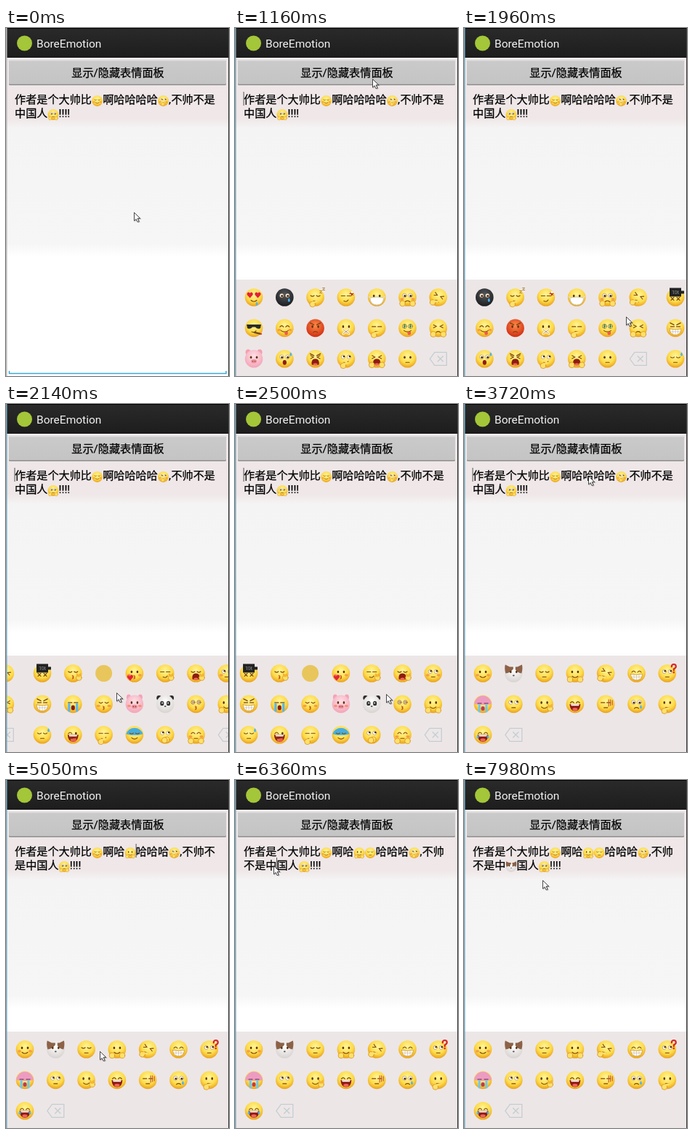
An HTML page for the animation above (8000 ms loop, 307 by 480 pixels).

```html
<!DOCTYPE html>
<html lang="zh">
<head>
<meta charset="utf-8">
<title>BoreEmotion</title>
<style>
html, body { margin: 0; width: 100%; height: 100%; overflow: hidden; background: #fff; }
svg { display: block; width: 100%; height: 100%; }
text { font: 15.15px Roboto, "Noto Sans CJK SC", "Noto Sans CJK", sans-serif; fill: #000; stroke: #000; stroke-width: .25px; }
#title { font-size: 15.5px; fill: #f2f2f2; stroke: none; }
</style>
</head>
<body>
<svg viewBox="0 0 307 480" preserveAspectRatio="none">
  <defs id="defs">
    <linearGradient id="bar" x2="0" y2="1"><stop stop-color="#2a2a2a"/><stop offset="1" stop-color="#1d1d1d"/></linearGradient>
    <linearGradient id="btn" x2="0" y2="1"><stop stop-color="#cacaca"/><stop offset="1" stop-color="#c4c4c4"/></linearGradient>
    <linearGradient id="bg" gradientUnits="userSpaceOnUse" x1="0" x2="0" y1="41" y2="480">
      <stop stop-color="#eee6e7"/><stop offset=".19" stop-color="#efe7e8"/><stop offset=".222" stop-color="#f5f4f4"/>
      <stop offset=".585" stop-color="#f6f6f6"/><stop offset=".625" stop-color="#fff"/>
    </linearGradient>
    <radialGradient id="yellow" cy=".35" r=".66"><stop stop-color="#fff59a"/><stop offset=".6" stop-color="#fddb4a"/><stop offset="1" stop-color="#e99e18"/></radialGradient>
    <radialGradient id="red" cy=".35" r=".66"><stop stop-color="#ff8a4a"/><stop offset="1" stop-color="#cf2c10"/></radialGradient>
    <radialGradient id="black" cy=".35" r=".66"><stop stop-color="#55585c"/><stop offset="1" stop-color="#1b1d20"/></radialGradient>
    <radialGradient id="pink" cy=".35" r=".66"><stop stop-color="#ffe0e6"/><stop offset="1" stop-color="#f2a3b6"/></radialGradient>
    <radialGradient id="white" cy=".35" r=".66"><stop stop-color="#fff"/><stop offset="1" stop-color="#d6d2cf"/></radialGradient>
    <clipPath id="view"><rect x="1" y="347" width="306" height="133"/></clipPath>
  </defs>
  <rect width="307" height="480" fill="url(#bg)"/>
  <path id="line" d="M4.5 473v3.5h298.5v-3.5" fill="none" stroke="#3fa9d0" stroke-width="1.5"/>
  <rect width="307" height="41" fill="url(#bar)"/>
  <rect width="307" height="1" fill="#000"/>
  <rect y="40" width="307" height="1" fill="#151515"/>
  <rect y="41" width="307" height="1" fill="#f6f2f2"/>
  <circle cx="25.5" cy="21" r="10.5" fill="#a4c639"/>
  <text id="title" x="42" y="26.5">BoreEmotion</text>
  <rect x="4" y="45" width="299" height="34" rx="1.5" fill="#8f8f8f"/>
  <rect x="4" y="44.5" width="299" height="33" rx="1.5" fill="url(#btn)"/>
  <path d="M5 45h297" stroke="#dcdcdc"/>
  <text x="154" y="67" text-anchor="middle">显示/隐藏表情面板</text>
  <g id="texts"></g>
  <rect id="caret" width="1" height="19" fill="#555"/>
  <g id="panel">
    <rect y="347" width="307" height="133" fill="#ede6e7"/>
    <g clip-path="url(#view)"><g id="strip"></g></g>
  </g>
  <rect id="edge" width="1.5" height="480"/>
  <rect x="306" width="1" height="480" fill="#3a3a3a"/>
  <path id="handle" d="M0 0l11.5 11v22a3 3 0 0 1-3 3h-17a3 3 0 0 1-3-3v-22z" fill="#33b5e5" opacity=".75"/>
  <g id="mouse">
    <path d="M1.5 1.5v12l3-2.7 2 4 2.2-1-1.9-4h4z" fill="#000" opacity=".25"/>
    <path d="M.5.5v11.5l2.7-2.5 1.9 4.2 2-.9-1.9-4.1h3.6z" fill="#fff" stroke="#333" stroke-width=".9"/>
  </g>
</svg>
<script>
const $ = id => document.getElementById(id);
const ink = '#7d460f';

// Emoji parts, drawn around 0,0 on a face of radius 12
const pair = f => f(-4) + f(4);
const path = (d, a = '') => `<path d="${d}" ${a}/>`;
const disc = (x, y, r, fill, a = '') => `<circle cx="${x}" cy="${y}" r="${r}" fill="${fill}" ${a}/>`;
const oval = (x, y, rx, ry, fill) => `<ellipse cx="${x}" cy="${y}" rx="${rx}" ry="${ry}" fill="${fill}" stroke="none"/>`;
const bare = 'stroke="none"';
const fill = c => `fill="${c}" ${bare}`;
const hand = (x, y) => disc(x, y, 3.8, '#fee06a', 'stroke="#d8921c" stroke-width=".8"');
const drop = (x, y) => path(`M${x} ${y}q-3 4 0 5.5q3-1.5 0-5.5`, fill('#4fb2ee'));
const heart = (x, y) => path(`M${x} ${y + 4}l-4-4.5q-.5-3.5 2.3-3.5q1.4 0 1.7 1.6q.3-1.6 1.7-1.6q2.8 0 2.3 3.5z`, fill('#e3203a'));
const ears = (rx, ry, x, y, c) => oval(-x, y, rx, ry, c) + oval(x, y, rx, ry, c);

const parts = {
  dot: pair(x => oval(x, -2, 1.3, 1.8, '#5a300a')),
  wide: pair(x => disc(x, -2.5, 2.8, '#fff', 'stroke-width=".4"') + disc(x + .4, -2, 1.5, '#4a2a0c', bare)),
  side: pair(x => disc(x, -2.5, 2.6, '#fff', 'stroke-width=".4"') + disc(x + 1, -3.3, 1.3, '#4a2a0c', bare)),
  shut: pair(x => path(`M${x - 2.5} -2.5q2.5 2.4 5 0`)),
  arc: pair(x => path(`M${x - 2.5} -1.5q2.5-3.6 5 0`)),
  flat: pair(x => path(`M${x - 2.6} -2h5.2`)),
  wink: path('M-6.500-1.500q2.500-3.600 5 0') + oval(4, -2, 1.3, 1.8, '#5a300a'),
  squint: path('M-6.5-4.5l4 2.2-4 2M6.5-4.5l-4 2.2 4 2'),
  cross: pair(x => path(`M${x - 2} 0l4 4m0-4l-4 4`)),
  love: pair(x => heart(x * 1.35, -3)),
  cash: pair(x => disc(x, -2.5, 3, '#f7f0b0', 'stroke-width=".6"') + path(`M${x + 1.3} -4q-3-1-2.6.7t2.4 1-2.8.9M${x} -5v5`, 'stroke="#2c7a2c" stroke-width=".8"')),
  swirl: pair(x => disc(x, -2.5, 2.6, '#fff6cc', 'stroke-width=".7"') + disc(x, -2.5, 1, 'none', 'stroke-width=".7"')),
  shades: path('M-10-5h20l-1 5q-4 2.500-7-1.500h-4q-3 4-7 1.500z', fill('#2b2b2b')),
  brow: path('M-7-7l5 2.500M7-7l-5 2.500', 'stroke-width="1.500"'),
  smile: path('M-4 4q4 3.600 8 0'),
  sad: path('M-3 6q3-2.600 6 0'),
  line: path('M-2.500 5h5'),
  smirk: path('M-3 5q4 2 6-1.500'),
  kiss: path('M-1 3q3 1 .500 2.200q2.500 1.200-.500 2.300', 'stroke="#b4401a"'),
  ohh: oval(0, 5, 2.6, 3.4, '#8c1d10'),
  open: path('M-7.500 0h15q-.500 9.500-7.500 9.500t-7.500-9.500', fill('#8e1a12')) + path('M-6 .300h12l-1 2h-10z', fill('#fff')) + oval(0, 7, 3.6, 2, '#f0655c'),
  roar: path('M-5 8q-1-8 5-8t5 8q-5 2-10 0', fill('#8c1d10')) + oval(0, 7.5, 3, 1.5, '#f0655c'),
  teeth: path('M-8 1q8 2 16 0q-.500 8.500-8 8.500t-8-8.500', 'fill="#fff" stroke="#c58a2a" stroke-width=".7"') + path('M-7 5h14M-3.500 2v6.500M0 2v7M3.500 2v6.500', 'stroke="#b9a58a" stroke-width=".5"'),
  tongue: path('M-5 3.500q5 3.500 10 0') + path('M0 5h4.500v3q-2.200 3-4.500 0z', fill('#ee5a50')),
  tape: path('M-4 2l8 6m0-6l-8 6', 'stroke="#fff6dc" stroke-width="3"') + path('M-4 2l8 6m0-6l-8 6', 'stroke-width=".5"'),
  mask: path('M-9.500 1q9.500-3 19 0q-1 9.500-9.500 9.500t-9.500-9.500', 'fill="#fff" stroke="#bcc5c9" stroke-width=".9"') + path('M-11-1l2 2M11-1l-2 2', 'stroke="#dde"'),
  blush: pair(x => `<g opacity=".65">${oval(x * 1.85, 2.5, 2.4, 1.7, '#f57a4a')}</g>`),
  hands: hand(-7, 8.5) + hand(7, 8.5),
  chin: hand(-4, 9.5) + path('M-3 7l5-1.500', 'stroke="#fee06a" stroke-width="2.600"'),
  palm: hand(8, 6) + path('M7 4l-1.500-3M9 4l1-3', 'stroke="#f2b32d" stroke-width="2"'),
  cover: hand(2, 6.5) + hand(-1, 7.5),
  sweat: drop(8.5, -9),
  tear: drop(6, 1),
  tears: drop(-7, 0) + drop(7, 0),
  drool: drop(4, 6),
  cry: pair(x => path(`M${x * 1.35} 0v9`, 'stroke="#58b7f0" stroke-width="3.200"')),
  wet: pair(x => path(`M${x * 1.2} 1v9`, 'stroke="#6cc9f2" stroke-width="3"')) + oval(0, 6, 2.6, 3, '#c23a4a'),
  band: path('M-11.500-3a12 12 0 0 1 23 0v3q-11 2-23 0z', fill('#ec9cc0')) + path('M-7-1h5M2-1h5', 'stroke="#8a3560"'),
  zzz: path('M6-9h3l-3 3h3M10-13h3l-3 3h3', 'stroke="#b58a3a" stroke-width="1"'),
  star: path('M5-5l5 0M7.500-7.500v5M6-7l3.500 4', 'stroke="#b22a20"') + disc(8, -7, 1.4, '#fff', bare),
  cigar: path('M1 6l8 2', 'stroke="#73441c" stroke-width="2.500"') + disc(10, 8, 1.2, '#ee4a20', bare),
  bars: path('M4-6v9M6.500-6v8M9-5v6', 'stroke="#c0522a"'),
  ask: path('M6-9q0-3.500 3-3.500t3 3q0 2-3 3.500v2', 'stroke="#d8261c" stroke-width="2.200"') + disc(9, -1.2, 1.2, '#d8261c', bare),
  lips: heart(-6, 6),
  cap: path('M-11.500-1a12 12 0 0 1 23 0q-11 3-23 0', fill('#45aee0')),
  block: path('M-8-13h16v12h-16zM8-9h4v4h-4z', fill('#222')) + `<text y="-4.5" text-anchor="middle" stroke="none" style="font-size:7px;fill:#fff">10t</text>`,
  snout: oval(0, 3.5, 4, 2.7, '#f08fa0') + disc(-1.5, 3.5, .8, ink, bare) + disc(1.5, 3.5, .8, ink, bare),
  spots: pair(x => oval(x * 1.1, -1, 2.6, 3.2, '#333') + disc(x, -1.5, .9, '#fff', bare)),
  nose: oval(0, 3, 1.4, 1, '#555'),
  fur: path('M-11 0q-2-7-.500-12l6 3h5v3l-4 4q-4 2-6.500 2M11 0q2-7 .500-12l-6 3h-3v4l3 3q3 2 5.500 2', fill('#8c6248'))
};

const pages = [
  ['love smile drool', 'black: wide tear', 'shut line zzz chin', 'flat smirk star', 'mask dot', 'wide sad hands blush', 'tilt: squint sad chin',
   'shades smirk cigar', 'arc tongue blush', 'red: brow dot sad', 'dot tape', 'flat line chin', 'cash tongue', 'squint sad hands',
   'pig: dot snout', 'wide ohh sweat', 'brow squint roar', 'side smirk chin', 'squint roar hands', 'dot line', 'del'],
  ['cross block', 'shut kiss palm', 'plain', 'dot kiss lips blush', 'flat smirk palm', 'shut roar palm', 'side line blush',
   'brow flat teeth', 'flat ohh cry', 'shut kiss blush', 'rabbit: dot snout blush', 'panda: spots nose', 'swirl kiss', 'dot smile hands',
   'shut line sweat', 'wink open tongue', 'flat smirk chin', 'cap shut smile', 'side cover', 'arc line hands blush', 'del'],
  ['dot smile blush', 'cat: fur dot nose', 'shut line', 'dot smile hands', 'tilt: squint line chin', 'arc teeth', 'side line ask',
   'band wet', 'side line', 'dot smile palm', 'arc open', 'flat line bars', 'wide sad tear', 'dot line chin',
   'arc open tears', 'del'],
  ['shut smile blush', 'side cover blush', 'wide line hands']
];
const skins = {
  black: ['black'], red: ['red'],
  pig: ['pink', ears(3.5, 4, 8, -9, '#f3a0b0')],
  rabbit: ['pink', ears(3, 4, 8, -9.5, '#f4a3b9')],
  panda: ['white', ears(3.4, 3.4, 8.5, -8.5, '#2a2a2a')],
  cat: ['white']
};

function emoji(spec) {
  if (spec === 'plain') return disc(0, 0, 11.5, '#e8c65c');
  if (spec === 'del') return path('M-11.500 0l6.500-9h16.500v18h-16.500zM-1-4l8 8m0-8l-8 8', 'fill="none" stroke="#c3ced2" stroke-width="1.300"');
  const [, kind, list] = spec.match(/^(?:(\w+): )?(.*)$/);
  const [skin, back = ''] = skins[kind] || ['yellow'];
  const turn = kind === 'tilt' ? 'transform="rotate(25)"' : '';
  return `<g fill="none" stroke="${ink}" stroke-width="1.1" stroke-linecap="round" ${turn}>` +
    back + disc(0, 0, 12.3, `url(#${skin})`, bare) + list.split(' ').map(k => parts[k]).join('') + '</g>';
}

const W = 305;
const use = (id, x, y, s = 1) => `<use href="#${id}" transform="translate(${x} ${y}) scale(${s})"/>`;
let defs = '', strip = '';
pages.forEach((page, p) => page.forEach((spec, i) => {
  const id = `e${p}_${i}`;
  defs += `<g id="${id}">${emoji(spec)}</g>`;
  if (p < 3) strip += use(id, p * W + 26 + i % 7 * 42.3, 371.5 + (i / 7 | 0) * 42.4);
}));
$('defs').innerHTML += defs;
$('strip').innerHTML = strip;

// Letters a, b, c stand for the first emojis in the text; h, s, k for those typed in
const EM = 15.15;
const marks = { a: 'e3_0', b: 'e3_1', c: 'e3_2', h: 'e2_3', s: 'e2_2', k: 'e2_1' };
const narrow = { ',': .22, '!': .257 };
const messages = [
  [0, '作者是个大帅比a啊哈哈哈哈b,不帅不是\n中国人c!!!!'],
  [4860, '作者是个大帅比a啊哈h哈哈哈b,不帅不\n是中国人c!!!!'],
  [5490, '作者是个大帅比a啊哈hs哈哈哈b,不帅\n不是中国人c!!!!'],
  [7300, '作者是个大帅比a啊哈hs哈哈哈b,不帅\n不是中k国人c!!!!']
];
function layout(msg) {
  return msg.split('\n').map((row, n) => {
    let x = 12;
    return row.match(/[a-z]|[,!]+|[^a-z,!]+/g).map(run => {
      const at = x;
      for (const ch of run) x += EM * (narrow[ch] || 1);
      return marks[run]
        ? use(marks[run], at + EM / 2, 100.5 + n * 19, .6)
        : `<text x="${at}" y="${103.5 + n * 19}">${run}</text>`;
    }).join('');
  }).join('');
}
$('texts').innerHTML = messages.map(m => `<g>${layout(m[1])}</g>`).join('');
const texts = [...$('texts').children];

// Mouse: start, end, x, y reached
const moves = [
  [0, 0, 176, 254], [320, 800, 187, 61], [1160, 1700, 262, 398], [1900, 2140, 152, 398],
  [2200, 2440, 222, 400], [2500, 2740, 90, 397], [3120, 3720, 171, 99], [3980, 4600, 155, 377],
  [4860, 5230, 112, 372], [5490, 6100, 53, 118], [6490, 6970, 72, 375], [7680, 7980, 108, 138]
];
// Page scroll: time, offset
const scroll = [
  [0, 0], [1900, 6], [1960, 40], [2020, 120], [2080, 225], [2140, 281], [2200, 300], [2260, W],
  [2500, 312], [2560, 350], [2620, 440], [2680, 540], [2740, 586], [2800, 603], [2860, 609], [2920, 2 * W]
];
// Caret: time, x (0 hides it), row
const carets = [
  [0, 0, 0], [60, 11.5, 0], [560, 0, 0], [1060, 11.5, 0], [1560, 0, 0], [2060, 11.5, 0], [2560, 0, 0],
  [3120, 11.5, 0], [3980, 163.5, 0], [4480, 0, 0], [4860, 178.6, 0], [5230, 0, 0], [5490, 193.8, 0], [6040, 0, 0],
  [6360, 57, 1], [6850, 0, 0], [7300, 72.2, 1], [7480, 0, 0], [7680, 72.2, 1], [7980, 0, 0]
];
// Insertion handle: from, to, x, y
const handles = [[4040, 4860, 164, 107], [6490, 7300, 57, 126]];
const PANEL_AT = 920;

const last = (table, t) => table.findLast(r => r[0] <= t);
const show = (el, on) => el.setAttribute('visibility', on ? 'visible' : 'hidden');
const move = (el, x, y) => el.setAttribute('transform', `translate(${x} ${y})`);

function mouseAt(t) {
  const i = moves.findLastIndex(m => m[0] <= t);
  const [from, to, x, y] = moves[i];
  if (!i || t >= to) return [x, y];
  const n = Math.round((to - from) / 60);
  const p = Math.min(1, (Math.floor((t - from) / 60) + 1) / (n + 1));
  const e = p * p * (3 - 2 * p);
  const [, , x0, y0] = moves[i - 1];
  return [Math.round(x0 + (x - x0) * e), Math.round(y0 + (y - y0) * e)];
}

function draw() {
  const t = performance.now() % 8000;
  move($('mouse'), ...mouseAt(t));
  move($('strip'), -last(scroll, t)[1], 0);
  const open = t >= PANEL_AT;
  show($('panel'), open);
  show($('line'), !open);
  $('edge').setAttribute('fill', open ? '#78a8bb' : '#b9b9b9');
  const now = messages.findLastIndex(m => m[0] <= t);
  texts.forEach((g, i) => show(g, i === now));
  const [, cx, row] = last(carets, t);
  show($('caret'), cx);
  move($('caret'), cx, 88 + row * 19);
  const h = handles.find(r => t >= r[0] && t < r[1]);
  show($('handle'), h);
  if (h) move($('handle'), h[2], h[3]);
  requestAnimationFrame(draw);
}
draw();
</script>
</body>
</html>
```
